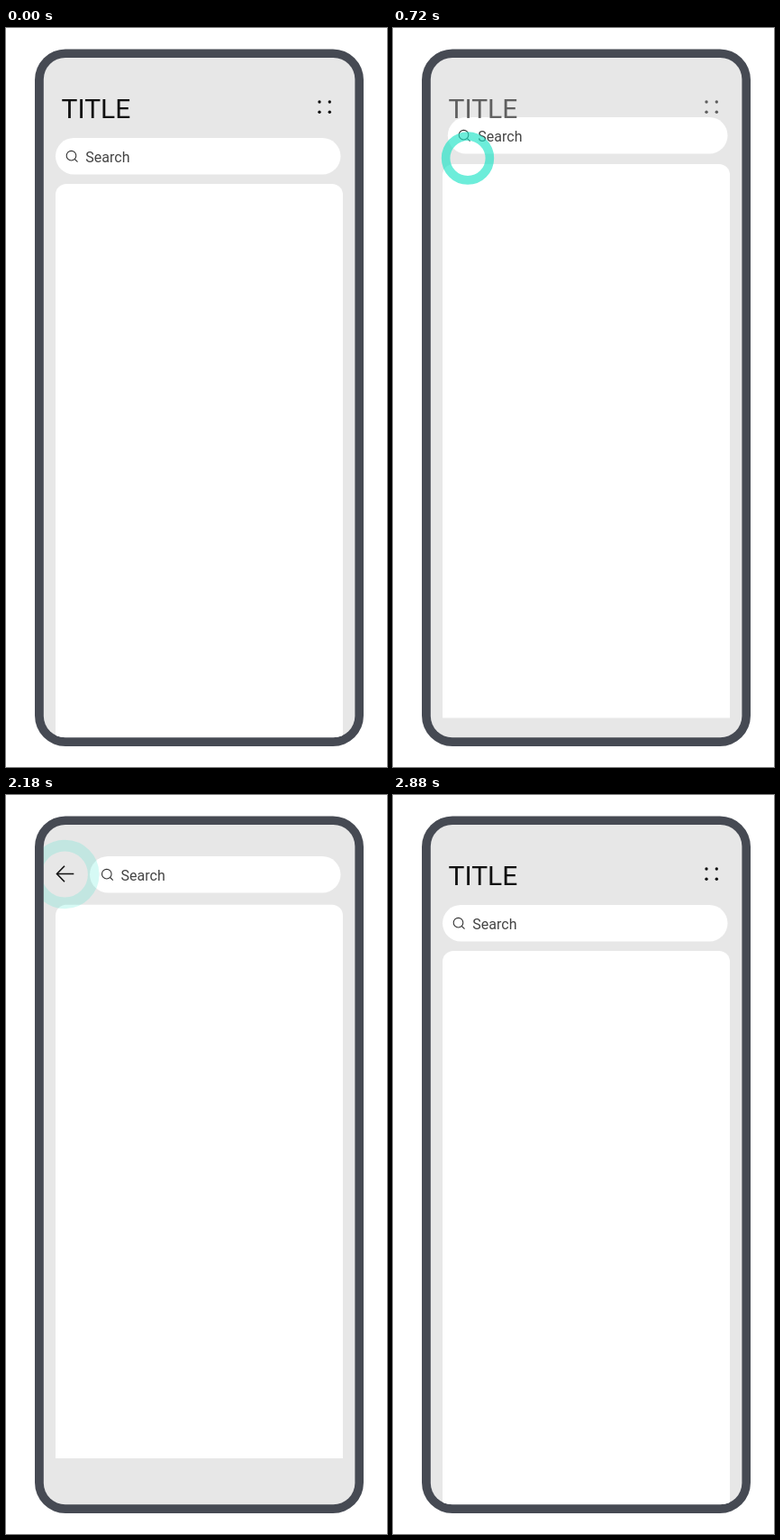
Recreate the animation shown at these times as an HTML page with a canvas. Size 423 by 820 pixels, loop 3.4 s.

```html
<!DOCTYPE html>
<html lang="en">
<head>
<meta charset="utf-8">
<title>Search bar transition</title>
<style>
  html, body { margin: 0; width: 100%; height: 100%; overflow: hidden; background: #fff; }
  canvas { display: block; width: 423px; height: 820px; }
</style>
</head>
<body>
<canvas id="stage"></canvas>
<script>
const W = 423, H = 820, LOOP = 3400;
const canvas = document.getElementById('stage');
const ctx = canvas.getContext('2d');
const dpr = window.devicePixelRatio || 1;
canvas.width = W * dpr;
canvas.height = H * dpr;

const clamp = v => Math.max(0, Math.min(1, v));
const lerp = (a, b, p) => a + (b - a) * p;
const ramp = (t, from, to) => clamp((t - from) / (to - from));
const smooth = p => p * p * (3 - 2 * p);

// Cubic bezier easing with control points (a, 0) and (b, 1).
function bezier(a, b) {
  return p => {
    let lo = 0, hi = 1;
    for (let i = 0; i < 24; i++) {
      const u = (lo + hi) / 2, v = 1 - u;
      const x = 3 * a * u * v * v + 3 * b * u * u * v + u * u * u;
      if (x < p) lo = u; else hi = u;
    }
    return smooth((lo + hi) / 2);
  };
}

const easeRise = bezier(0.4, 0.2);
const easeSlide = bezier(0.6, 0.4);
const easeEdge = bezier(0.52, 0.4);

const OPEN = [552, 1077], CLOSE = [2340, 2865];
const TAP = 420, TAP_BACK = 2180;

function pose(t) {
  const fwd = ramp(t, ...OPEN), back = ramp(t, ...CLOSE);
  return {
    rise: easeRise(fwd) - easeRise(back),
    slide: easeSlide(fwd) - easeSlide(back),
    edge: easeSlide(fwd) - easeEdge(back),
    title: 1 - ramp(t, 625, 888) + ramp(t, 2530, 2870),
    arrow: ramp(t, 840, 1095) - ramp(t, 2340, 2595)
  };
}

function box(x, y, w, h, r, color) {
  ctx.beginPath();
  ctx.roundRect(x, y, w, h, r);
  ctx.fillStyle = color;
  ctx.fill();
}

function text(str, x, y, size, color) {
  ctx.font = `400 ${size}px Roboto, sans-serif`;
  ctx.fillStyle = color;
  ctx.fillText(str, x, y);
}

function circle(x, y, r) {
  ctx.beginPath();
  ctx.arc(x, y, r, 0, Math.PI * 2);
}

function polyline(...points) {
  ctx.beginPath();
  points.forEach(([x, y]) => ctx.lineTo(x, y));
  ctx.stroke();
}

function drawSearch(p) {
  const top = lerp(122, 68, p.rise);
  const left = lerp(55, 93, p.edge);
  const shift = lerp(0, 39.3, p.slide);
  box(left, top, 371.5 - left, 40.5, 20.25, '#fff');

  const cx = 72.5 + shift, cy = top + 19.7;
  ctx.strokeStyle = '#333';
  ctx.lineWidth = 1.1;
  circle(cx, cy, 5.3);
  ctx.stroke();
  polyline([cx + 3.8, cy + 3.8], [cx + 7, cy + 7]);
  text('Search', 88.3 + shift, top + 27, 16, '#444');
}

function drawHeader(alpha) {
  if (alpha <= 0) return;
  ctx.globalAlpha = alpha;
  text('TITLE', 61.5, 99.5, 30, '#111');
  for (const x of [348, 359.3]) {
    for (const y of [82, 93.2]) {
      circle(x, y, 1.7);
      ctx.fill();
    }
  }
  ctx.globalAlpha = 1;
}

function drawArrow(alpha) {
  if (alpha <= 0) return;
  ctx.globalAlpha = alpha;
  ctx.strokeStyle = '#111';
  ctx.lineWidth = 1.6;
  polyline([65, 78.8], [56.5, 87.5], [65, 96.2]);
  polyline([56.5, 87.5], [75.3, 87.5]);
  ctx.globalAlpha = 1;
}

// Touch ring: closes in while it turns solid, then opens and fades.
function drawTap(age, x, y) {
  if (age < 0 || age >= 400) return;
  const p = smooth(ramp(age, 0, 180)) - smooth(ramp(age, 220, 400));
  const scale = lerp(1, 0.59, p);
  ctx.globalAlpha = lerp(0.18, 1, p);
  ctx.strokeStyle = '#20e3c6';
  ctx.lineWidth = 12.6 * scale;
  circle(x, y, 31.9 * scale);
  ctx.stroke();
  ctx.globalAlpha = 1;
}

function draw(t) {
  const p = pose(t);
  ctx.setTransform(dpr, 0, 0, dpr, 0, 0);
  ctx.fillStyle = '#fff';
  ctx.fillRect(0, 0, W, H);

  box(32, 23.5, 365, 773.5, 34, '#464a53');
  box(41.8, 33, 345.6, 754.3, 24, '#e7e7e7');
  ctx.save();
  ctx.clip();
  box(55, lerp(173, 121.7, p.rise), 319, 614.3, [12, 12, 0, 0], '#fff');
  drawSearch(p);
  drawHeader(p.title);
  drawArrow(p.arrow);
  drawTap(t - TAP, 83, 144.5);
  drawTap(t - TAP_BACK, 65.3, 88);
  ctx.restore();
}

const start = performance.now();
function tick() {
  draw((performance.now() - start) % LOOP);
  requestAnimationFrame(tick);
}
tick();
</script>
</body>
</html>
```
